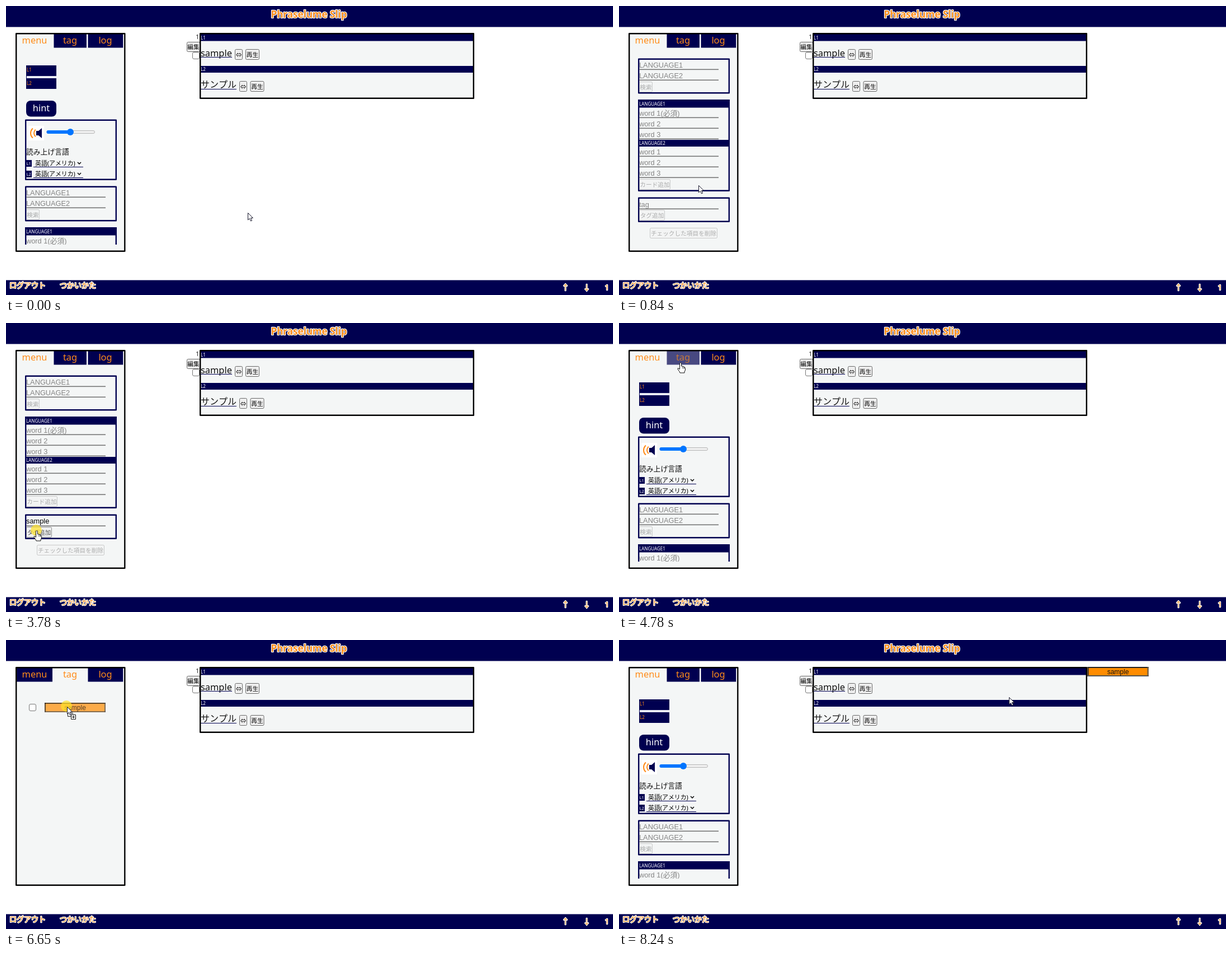
An HTML page with a canvas for the animation above (8630 ms loop, 1085 px wide and 516 px high).

```html
<!DOCTYPE html>
<html lang="ja">
<head>
<meta charset="utf-8">
<title>Phraselume Slip</title>
<style>
html, body { margin: 0; width: 100%; height: 100%; overflow: hidden; background: #fff; }
canvas { display: block; }
</style>
</head>
<body>
<canvas id="stage" width="1085" height="516"></canvas>
<script>
const ctx = document.getElementById('stage').getContext('2d');
const LOOP = 8630;
const NAVY = '#000050', ORANGE = '#ff8c1a', PAPER = '#f4f6f6', GREY = '#767676';
const UI = '"Noto Sans", "Noto Sans CJK JP", "Noto Sans CJK", sans-serif';
const FIELD = '"Liberation Sans", "Noto Sans CJK JP", "Noto Sans CJK", sans-serif';

function rect(x, y, w, h, color) {
  ctx.fillStyle = color;
  ctx.fillRect(x, y, w, h);
}

function text(str, x, y, size, color, font = UI, align = 'left') {
  ctx.font = size + 'px ' + font;
  ctx.textAlign = align;
  ctx.fillStyle = color;
  ctx.fillText(str, x, y);
}

function glowText(str, x, y, size, weight, align = 'left') {
  ctx.font = weight + ' ' + size + 'px ' + UI;
  ctx.textAlign = align;
  ctx.lineJoin = 'round';
  ctx.lineWidth = 2.4;
  ctx.strokeStyle = '#fff';
  ctx.strokeText(str, x, y);
  ctx.fillStyle = ORANGE;
  ctx.fillText(str, x, y);
}

function rounded(x, y, w, h, r, fill, stroke, line = 1) {
  ctx.beginPath();
  ctx.roundRect(x, y, w, h, r);
  if (fill) { ctx.fillStyle = fill; ctx.fill(); }
  if (stroke) { ctx.strokeStyle = stroke; ctx.lineWidth = line; ctx.stroke(); }
}

function frame(x, y, w, h, line, color) {
  ctx.lineWidth = line;
  ctx.strokeStyle = color;
  ctx.strokeRect(x + line / 2, y + line / 2, w - line, h - line);
}

function shape(points, fill, stroke, line = 1) {
  ctx.beginPath();
  for (const [x, y] of points) ctx.lineTo(x, y);
  ctx.closePath();
  ctx.fillStyle = fill;
  ctx.fill();
  if (stroke) { ctx.strokeStyle = stroke; ctx.lineWidth = line; ctx.lineJoin = 'miter'; ctx.stroke(); }
}

function button(label, x, y, w, h, enabled = true) {
  const k = enabled ? 1 : 0.3;
  rounded(x + 0.5, y + 0.5, w - 1, h - 1, 2, `rgba(239,239,239,${k})`, `rgba(105,105,105,${k})`);
  text(label, x + w / 2, y + h / 2 + 4, 10.67, `rgba(10,10,10,${k})`, UI, 'center');
}

function checkbox(x, y) {
  rounded(x + 0.5, y + 0.5, 12, 12, 2.5, '#fff', GREY);
}

function chip(x, y, alpha) {
  ctx.save();
  ctx.globalAlpha = alpha;
  rect(x, y, 109, 17, '#ff8c00');
  rect(x, y, 109, 2, '#222');
  rect(x, y, 2, 17, '#222');
  rect(x, y + 15, 109, 2, '#555');
  rect(x + 107, y, 2, 17, '#555');
  text('sample', x + 54.5, y + 12.7, 12, '#111', FIELD, 'center');
  ctx.restore();
}

// Number of discrete moves made so far, out of n spread over a..b.
function steps(t, a, b, n) {
  if (t < a) return 0;
  return Math.min(n, Math.floor((t - a) / (b - a) * (n - 1) + 0.02) + 1);
}

// Linear track through rows of [step, value, value].
function track(rows, k) {
  let i = 0;
  while (i < rows.length - 2 && rows[i + 1][0] <= k) i++;
  const [a, b] = [rows[i], rows[i + 1]];
  const p = Math.max(0, Math.min(1, (k - a[0]) / (b[0] - a[0])));
  return a.slice(1).map((v, j) => v + (b[j + 1] - v) * p);
}

const DRAG = [[1, 109, 119], [3, 150, 128], [5, 268, 149], [7, 408, 162], [8, 448, 162],
  [10, 640, 116], [11, 701, 101], [12, 697, 102]];
const MOVES = [
  [70, 430, 6, [[0, 432, 369], [1, 330, 345], [2, 205, 316], [3, 150, 303], [4, 146, 302]]],
  [700, 1240, 8, [[0, 146, 302], [2, 142, 320], [5, 128, 349]]],
  [3370, 3850, 8, [[0, 128, 349], [3, 90, 362], [6, 55, 371]]],
  [4430, 4780, 6, [[0, 55, 371], [1, 59, 335], [4, 96, 125], [6, 110, 71]]],
  [5380, 5840, 7, [[0, 110, 71], [6, 109, 119]]],
  [6650, 7420, 12, DRAG]
];
const SCROLL = [[2, 0], [3, 90], [4, 188], [5, 222], [6, 228]];
const KEYS = [1570, 1700, 1830, 2090, 2290, 2440];
const PRESSES = [[1086, 1240], [3780, 3850], [4980, 5120]];
const FOCUS = 1086, BLUR = 3780, SAVED = 4115, TAG_OPEN = 5050;
const GRAB = 6185, DRAG_ON = 6645, DROP = 7895, RELOAD = 8235;

const within = (v, a, b) => v >= a && v < b;

function pointer(t) {
  const m = MOVES.filter(m => t >= m[0] - 2).pop() || MOVES[0];
  return track(m[3], steps(t + 2, m[0], m[1], m[2]));
}

const FIELDS = [
  ['LANGUAGE1', 341], ['LANGUAGE2', 360],
  ['word 1(必須)', 427], ['word 2', 446], ['word 3', 465],
  ['word 1', 496], ['word 2', 515], ['word 3', 534]
];

function stateAt(t) {
  const s = { t };
  [s.x, s.y] = pointer(t);
  s.tagTab = within(t, TAG_OPEN, RELOAD);
  s.scroll = t < SAVED ? track(SCROLL, steps(t + 2, 70, 430, 6))[0] : 0;
  s.typed = t < SAVED ? 'sample'.slice(0, KEYS.filter(k => t >= k - 2).length) : '';
  s.focus = within(t, FOCUS, BLUR);
  const last = KEYS.filter(k => t >= k - 2).pop() || FOCUS;
  s.caret = s.focus && Math.floor((t + 2 - last) / 530) % 2 === 0;

  const doc = s.y + s.scroll;
  s.kind = 'arrow';
  s.hover = '';
  if (within(t, DRAG_ON, DROP)) s.kind = 'drag';
  else if (within(s.y, 50, 75) && within(s.x, 86, 145)) { s.kind = 'hand'; s.hover = 'tab'; }
  else if (s.tagTab) {
    if (within(s.x, 69, 178) && within(s.y, 112, 129)) { s.kind = 'hand'; s.hover = 'chip'; }
  } else if (within(s.x, 36, 178) && s.y > 85) {
    if ([...FIELDS, ['', 590]].some(f => within(doc, f[1] - 16, f[1] + 1))) s.kind = 'text';
    if (s.typed && s.x < 82 && within(doc, 592, 611)) { s.kind = 'hand'; s.hover = 'add'; }
  }
  return s;
}

function field(label, y) {
  text(label, 36, y - 3.5, 12.8, '#858585', FIELD);
  rect(36, y - 0.5, 142, 1.6, GREY);
}

function legend(label, y, h) {
  rect(34, y, 164, h, NAVY);
  text(label, 36, y + h - 3.5, 8, '#fff');
}

function select(label, y) {
  rect(36, y, 10, 12, NAVY);
  text(label, 36.5, y + 9, 7.5, '#fff');
  text('英語(アメリカ)', 52, y + 9.5, 10.9, '#000');
  rect(49, y + 12, 89, 1, NAVY);
  ctx.beginPath();
  ctx.moveTo(128, y + 4);
  ctx.lineTo(131, y + 7);
  ctx.lineTo(134, y + 4);
  ctx.lineWidth = 1.7;
  ctx.strokeStyle = '#111';
  ctx.stroke();
}

function speaker() {
  rect(40, 214, 28, 26, '#fff');
  rect(54, 223, 5, 8, NAVY);
  shape([[57, 224], [64, 218], [64, 236], [57, 230]], NAVY);
  ctx.strokeStyle = ORANGE;
  ctx.lineWidth = 2;
  for (const [x, r] of [[55, 11], [58, 8]]) {
    ctx.beginPath();
    ctx.arc(x, 227, r, Math.PI * 0.72, Math.PI * 1.28);
    ctx.stroke();
  }
}

function slider() {
  rounded(73, 222.5, 85.5, 5, 2.5, '#efefef', '#b5b5b5');
  rounded(72.5, 222, 43, 6, 3, '#0075ff');
  rounded(109, 219, 12, 12, 6, '#0075ff');
}

function menuPage(s) {
  ctx.save();
  ctx.beginPath();
  ctx.rect(34, 85, 165, 341);
  ctx.clip();
  ctx.translate(0, -Math.round(s.scroll));

  rect(36, 106, 54, 42, NAVY);
  rect(37, 125, 53, 4, '#e9ebf3');
  text('L1', 37, 117, 8, ORANGE);
  text('L2', 37, 140.5, 8, ORANGE);
  rounded(36, 169, 54, 28.5, 8, NAVY);
  text('hint', 63, 188, 16.4, '#fff', UI, 'center');

  frame(34, 202.5, 164, 108.5, 2.4, NAVY);
  speaker();
  slider();
  text('読み上げ言語', 36, 264.5, 12.8, '#111');
  select('L1', 275);
  select('L2', 294);

  frame(34, 321.5, 164, 63, 2.4, NAVY);
  frame(34, 395, 164, 164, 2.4, NAVY);
  legend('LANGUAGE1', 395, 14.5);
  legend('LANGUAGE2', 467, 12);
  for (const [label, y] of FIELDS) field(label, y);
  button('検索', 36, 363, 24, 19, false);
  button('カード追加', 36, 537, 56, 19, false);

  frame(34, 569.5, 164, 44.5, 2.4, NAVY);
  if (s.focus) rounded(36, 574.5, 141.5, 15.5, 2.5, PAPER, '#101010', 2);
  if (s.typed) {
    text(s.typed, 36, 585.7, 12.8, '#000', FIELD);
    if (!s.focus) rect(36, 589.5, 142, 1.6, GREY);
  } else if (s.focus) text('tag', 36, 585.7, 12.8, '#858585', FIELD);
  else field('tag', 590);
  if (s.caret) {
    ctx.font = '12.8px ' + FIELD;
    rect(Math.round(36 + ctx.measureText(s.typed).width), 575.5, 1, 13, '#000');
  }
  ctx.globalAlpha = s.hover === 'add' ? 0.7 : 1;
  button('タグ追加', 36, 592, 46, 19, !!s.typed);
  ctx.globalAlpha = 1;
  button('チェックした項目を削除', 55, 624, 121, 19, false);
  ctx.restore();
}

function tagPage(s) {
  checkbox(41, 114);
  chip(69, 112, s.hover === 'chip' || within(s.t, GRAB, DROP) ? 0.7 : 1);
}

function tabs(s) {
  ['menu', 'tag', 'log'].forEach((name, i) => {
    const active = i === (s.tagTab ? 1 : 0);
    const left = [19, 83, 146][i];
    ctx.globalAlpha = !active && i === 1 && s.hover === 'tab' ? 0.7 : 1;
    if (!active) {
      const x = i === 1 ? 85.5 : i === 2 ? 146.5 : left;
      rect(x, 50, [83, 144, 209.5][i] - x, 24.5, NAVY);
    }
    text(name, [51, 114.5, 177.5][i], 67, 16.4, ORANGE, UI, 'center');
    ctx.globalAlpha = 1;
    if (!active) {
      if (i === 1) rect(144, 50, 2.5, 24.5, '#fff');
      if (i === 2) rect(209.5, 50, 1.2, 24.5, '#fff');
    }
  });
}

function card(s) {
  text('1', 345, 59, 10, '#111', UI, 'right');
  button('編集', 323, 64, 24, 18);
  checkbox(333, 82);
  rect(346, 48, 491, 118, PAPER);
  rect(347, 50, 489, 12.5, NAVY);
  rect(347, 107, 489, 12, NAVY);
  frame(346, 48, 491, 118, 2.4, '#000');
  text('L1', 348, 59.5, 8, '#fff');
  text('L2', 348, 116, 8, '#fff');
  text('sample', 348, 89.5, 16.4, '#111');
  rect(348, 91, 56, 1, NAVY);
  text('サンプル', 348, 146, 16, '#111');
  rect(348, 148, 64, 1, NAVY);
  button('⇔', 409, 77, 14, 19);
  button('再生', 428, 77, 25, 19);
  button('⇔', 417, 134, 14, 19);
  button('再生', 436.5, 134, 25, 19);
  if (s.t >= RELOAD) chip(837.5, 48, 1);
}

function bars() {
  rect(0, 0, 1085, 37.5, NAVY);
  rect(0, 489.5, 1085, 26.5, NAVY);
  glowText('Phraselume Slip', 541.5, 21, 17, 'bold', 'center');
  glowText('ログアウト', 6, 503, 13, 'normal');
  glowText('つかいかた', 96, 503, 13, 'normal');
  glowText('↑', 1000, 507, 13, 'normal', 'center');
  glowText('↓', 1038, 507, 13, 'normal', 'center');
  glowText('1', 1074, 507, 12.5, 'normal', 'center');
}

function press(s) {
  const dragging = s.t >= 6715;
  if (!PRESSES.some(p => within(s.t, p[0], p[1])) && !within(s.t, GRAB, DROP)) return;
  ctx.beginPath();
  ctx.arc(s.x - 1, s.y - 1, 10, 0, Math.PI * 2);
  ctx.fillStyle = dragging ? 'rgba(250,165,60,.6)' : 'rgba(255,225,40,.7)';
  ctx.fill();
}

function ghost(s) {
  if (!within(s.t, 6715, DROP)) return;
  const k = steps(s.t + 2, 6650, 7420, 12);
  const [x, y] = track(DRAG, Math.min(k - 1, 11));
  chip(Math.round(x - 40), Math.round(y - 5), 0.75);
}

function cursor(s) {
  ctx.save();
  ctx.translate(Math.round(s.x), Math.round(s.y));
  if (s.kind === 'text') {
    rect(0, -6, 1, 13, '#222');
    rect(-2, -6, 5, 1, '#222');
    rect(-2, 6, 5, 1, '#222');
  } else if (s.kind === 'hand') {
    shape([[-1.5, 1], [0, -0.5], [1.5, 1], [1.5, 6], [3.5, 6], [5.5, 7], [7.5, 8], [8.5, 9.5], [8.5, 13],
      [7, 16], [7, 18], [-1, 18], [-2, 15.5], [-5, 11.5], [-4.5, 9.5], [-1.5, 11.5]], '#fff', '#111');
    rect(3.5, 6.5, 1, 4, '#333');
    rect(6, 8, 1, 3, '#333');
  } else {
    if (s.kind === 'drag') {
      frame(1, 11, 10, 7, 1, '#222');
      rect(7, 13.5, 10, 10, '#fff');
      frame(7, 14, 9, 9, 1, '#111');
      rect(9, 18, 5, 1, '#111');
      rect(11, 16, 1, 5, '#111');
    }
    shape([[0.5, 0.5], [0.5, 13], [3.4, 10.4], [5.5, 15], [7.6, 14], [5.6, 9.6], [9.4, 9.4]], '#fff', '#15152a');
  }
  ctx.restore();
}

function draw(t) {
  const s = stateAt(t);
  rect(0, 0, 1085, 516, '#fff');
  bars();
  card(s);
  rect(17, 48, 196, 391, PAPER);
  tabs(s);
  frame(17, 48, 196.5, 391, 2.4, '#000');
  if (s.tagTab) tagPage(s);
  else menuPage(s);
  press(s);
  ghost(s);
  cursor(s);
}

const start = performance.now();
function tick(now) {
  draw(Math.max(0, now - start) % LOOP);
  requestAnimationFrame(tick);
}
draw(0);
requestAnimationFrame(tick);
</script>
</body>
</html>
```
